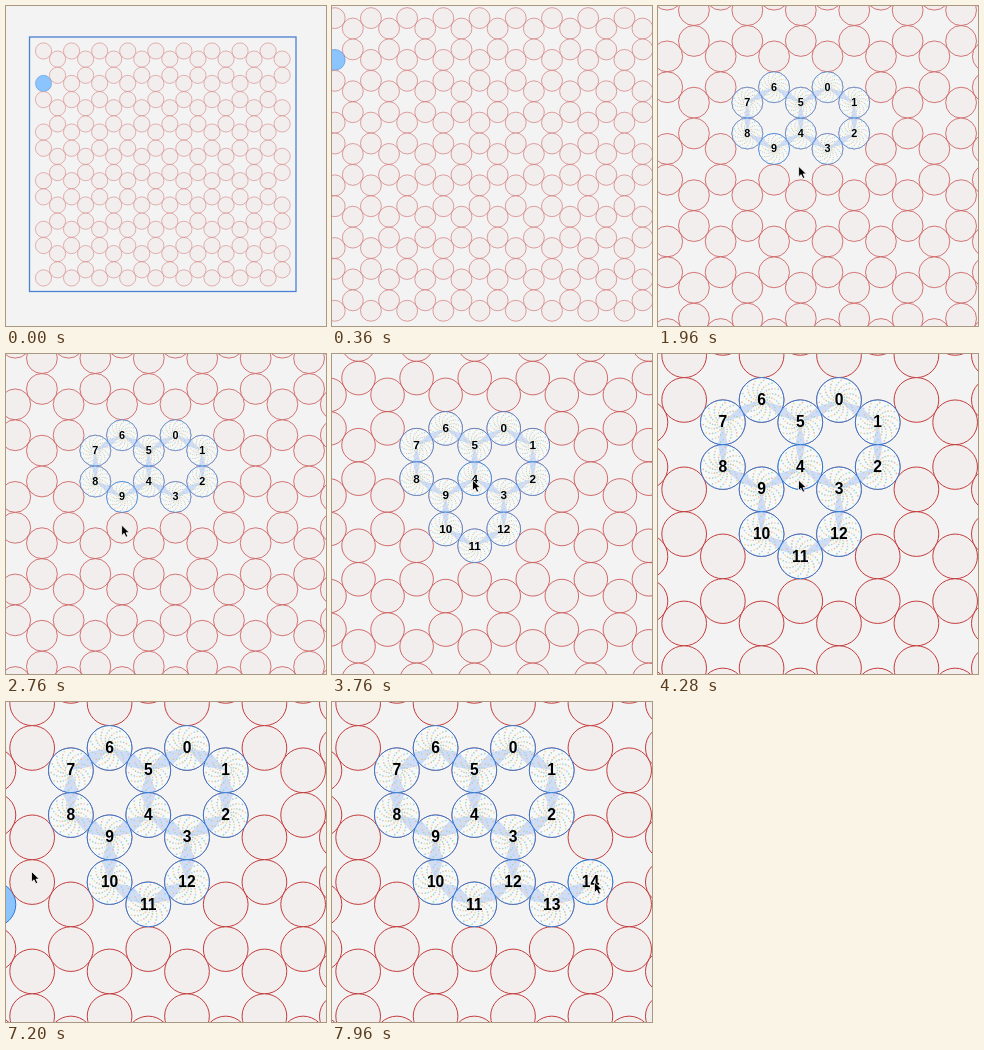
Write an HTML page that moves like this. It is 320 px wide and 320 px high and loops after 8 s.

```html
<!DOCTYPE html>
<html lang="en">
<head>
<meta charset="utf-8">
<title>Honeycomb numbering</title>
<style>
html, body { margin: 0; width: 100%; height: 100%; overflow: hidden; background: #f3f3f3; }
svg { display: block; width: 100vw; height: 100vh; }
.cell { fill: #f2eeee; stroke: #c23a3a; stroke-width: 2.2; }
.cell.hover { fill: #8cc4fd; stroke: #2f76cc; }
.disc { fill: #f7f8f8; }
.ring { fill: none; stroke: #2f76cc; stroke-width: 2.2; }
.wedge { fill: #cfddf8; }
.dots path { fill: none; stroke-width: 3.8; stroke-linecap: round; }
text { font: bold 35px "Liberation Sans", Arial, sans-serif; text-anchor: middle; }
</style>
</head>
<body>
<svg id="stage" viewBox="0 0 320 320">
  <defs><g id="dots" class="dots"></g></defs>
  <g id="world">
    <rect x="-86.3" y="-86.4" width="1644" height="1570" fill="none" stroke="#4a80d2" stroke-width="8"/>
    <g id="cells"></g>
    <g id="nodes"></g>
  </g>
  <path id="cursor" d="M0 0V10.6L2.5 8.3L4.3 12.2L6.2 11.3L4.5 7.6H7.8Z"
        fill="#000" stroke="#fff" stroke-width=".8"/>
</svg>
<script>
const LOOP = 8000, U = 100, COL = U * Math.sqrt(3) / 2;
const $ = id => document.getElementById(id);

function add(parent, tag, attrs = {}) {
  const el = document.createElementNS('http://www.w3.org/2000/svg', tag);
  for (const k in attrs) el.setAttribute(k, attrs[k]);
  return parent.appendChild(el);
}
const show = (el, on) => el.setAttribute('display', on ? 'inline' : 'none');
const clamp = v => Math.max(0, Math.min(1, v));
const ease = (t, a, b) => { const p = clamp((t - a) / (b - a)); return p * p * (3 - 2 * p); };
const mix = (a, b, p) => a + (b - a) * p;

// Honeycomb cells: 18 columns of 10
const cells = [];
for (let c = 0; c < 18; c++) {
  for (let k = 0; k < 10; k++) {
    const row = c % 2 ? 0.5 + 3 * (k >> 1) + k % 2 : 3 * ((k + 1) >> 1) - k % 2;
    const x = c * COL, y = row * U;
    cells.push({ x, y, el: add($('cells'), 'circle', { class: 'cell', cx: x, cy: y, r: 50 }) });
  }
}

// Speckles shared by every numbered node
['#a5d9ae', '#ecb9ae', '#e8e0a0', '#b4cbf0'].forEach((stroke, i) => {
  let d = '';
  for (let arm = 0; arm < 14; arm++) {
    for (let ring = 0; ring < 7; ring++) {
      if ((arm * 3 + ring) % 4 !== i) continue;
      const a = arm * Math.PI / 7 + ring * 0.13, r = 13 + ring * 5.2;
      d += `M${(r * Math.cos(a)).toFixed(1)} ${(r * Math.sin(a)).toFixed(1)}h.01`;
    }
  }
  add($('dots'), 'path', { d, stroke });
});

// Numbered nodes: a walk along the lattice, turning 60 degrees at every step
const nodes = [{ x: 9 * COL, y: 4.5 * U }];
let heading = 30;
for (const turn of 'RRRRRLLLLRLLRL'.slice(1) + '.') {
  const { x, y } = nodes[nodes.length - 1], a = heading * Math.PI / 180;
  nodes.push({ x: x + U * Math.cos(a), y: y + U * Math.sin(a) });
  heading += turn === 'R' ? 60 : -60;
}
// They appear in three strokes
const appears = i => i < 10 ? 1160 + 85 * i : i < 13 ? 2800 + 100 * (i - 10) : 7680 + 160 * (i - 13);
nodes.forEach((n, i) => { n.at = appears(i); });

nodes.forEach((n, i) => {
  n.el = add($('nodes'), 'g', { transform: `translate(${n.x} ${n.y})` });
  add(n.el, 'circle', { class: 'disc', r: 50 });
  n.wedges = nodes
    .filter(m => m !== n && Math.hypot(m.x - n.x, m.y - n.y) < U * 1.1)
    .map(m => ({ at: m.at, angle: Math.atan2(m.y - n.y, m.x - n.x), el: add(n.el, 'path', { class: 'wedge' }) }));
  add(n.el, 'use', { href: '#dots' });
  add(n.el, 'circle', { class: 'ring', r: 50 });
  add(n.el, 'text', { y: 11.5 }).textContent = i;
});

function wedge(angle, half) {
  const p = a => `${50 * Math.cos(a)} ${50 * Math.sin(a)}`;
  return `M0 0L${p(angle - half)}A50 50 0 0 1 ${p(angle + half)}Z`;
}

// Zoom in two stages; each keeps one point of the stage fixed
const far = { s: 16.21, x: 37.5, y: 45 };
const mid = { s: 30.85, x: -70.95, y: -57.6 };
const near = { s: 44.7, x: -167.4, y: -155.2 };
function camera(t) {
  const late = t > 2000;
  const [a, b] = late ? [mid, near] : [far, mid];
  const p = late ? ease(t, 3540, 4260) : ease(t, 0, 840);
  const s = a.s * Math.pow(b.s / a.s, p), q = (s - a.s) / (b.s - a.s);
  return { k: s / U, x: mix(a.x, b.x, q), y: mix(a.y, b.y, q) };
}

// The pointer visits each node as it appears, and a few places between
const visits = nodes.map(n => {
  const cam = camera(n.at);
  return [n.at, n.x * cam.k + cam.x + 4, n.y * cam.k + cam.y];
});
const route = [
  [880, 292, 275], [1080, 173, 80], [2240, 300, 295], [2440, 240, 60], [2660, 118, 142],
  [2760, 115.5, 171], [3180, 246, 250], [3360, 140.5, 126], [4360, 140.5, 126],
  [4840, -45, 235], [7120, -13, 202], [7200, 25, 169], [7440, 150, 290], ...visits
].sort((a, b) => a[0] - b[0]);

function pointer(t) {
  const i = route.findIndex(k => k[0] > t);
  if (i < 1) return route.at(i).slice(1);
  const [a, ax, ay] = route[i - 1], [b, bx, by] = route[i];
  const p = (t - a) / (b - a);
  return [mix(ax, bx, p), mix(ay, by, p)];
}

function draw(t) {
  const cam = camera(t);
  $('world').setAttribute('transform', `translate(${cam.x} ${cam.y}) scale(${cam.k})`);

  // The highlight trails the pointer slightly
  const [hx, hy] = pointer(t - 60);
  const [wx, wy] = t < 880 ? [0, 2 * U] : [(hx - cam.x) / cam.k, (hy - cam.y) / cam.k];
  for (const c of cells) {
    const on = Math.hypot(c.x - wx, c.y - wy) < 50;
    c.el.setAttribute('class', on ? 'cell hover' : 'cell');
  }

  const half = mix(0.22, 0.34, clamp((t - 5740) / 900));
  for (const n of nodes) {
    show(n.el, t >= n.at);
    for (const w of n.wedges) {
      show(w.el, t >= w.at);
      w.el.setAttribute('d', wedge(w.angle, half));
    }
  }

  const [x, y] = pointer(t);
  $('cursor').setAttribute('transform', `translate(${x} ${y})`);
  show($('cursor'), (t >= 880 && t < 4840) || t >= 7200);
}

const start = performance.now();
function tick() {
  draw((performance.now() - start) % LOOP);
  requestAnimationFrame(tick);
}
draw(0);
requestAnimationFrame(tick);
</script>
</body>
</html>
```
